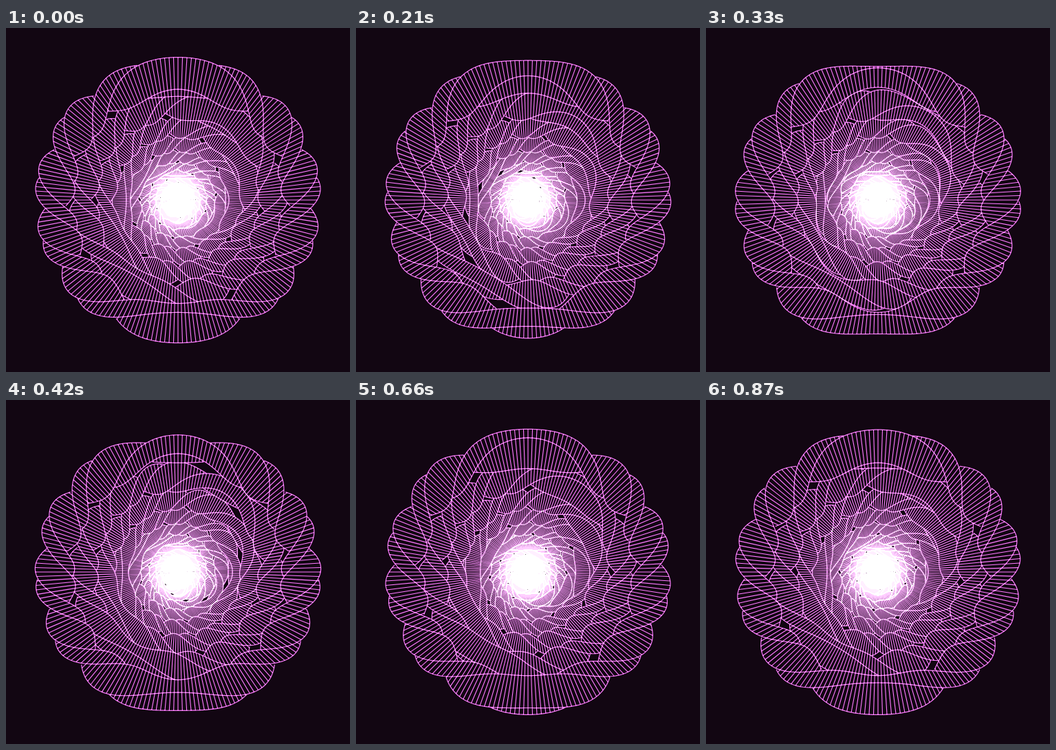
An HTML page with a canvas for the animation above (0.9 s loop, 500 by 500 pixels).

```html
<!DOCTYPE html>
<html lang="en">
<head>
<meta charset="utf-8">
<title>Twisting rings</title>
<style>
html, body { margin: 0; width: 100%; height: 100%; overflow: hidden; background: #120612; }
canvas { display: block; width: 500px; height: 500px; }
</style>
</head>
<body>
<canvas id="stage" width="500" height="500"></canvas>
<script>
const ctx = document.getElementById('stage').getContext('2d');
const LOOP = 900, STEP = 30;
const RINGS = 21, SPOKES = 200, FINE = 3;
const RADIUS = 179, SWING = 28.7, SHRINK = 0.772;
const TURN = Math.PI / 6;
const DEG = Math.PI / 180;
const BACK = '#120612';
// Corners of the twisted bar's cross-section.
const CORNERS = [82, 141, 262, 321].map(d => d * DEG);

// Twist of a ring at height s (1 at its pole, -1 opposite).
const twist = s => 7.8 * s - 0.85 * s * (1 - s * s) - 7.8;

const mix = (a, b, k) => Math.round(a + (b - a) * k);

function ringColor(i) {
  const k = Math.min(1, (i / 7.5) ** 2);
  return `rgb(${mix(238, 255, k)},${mix(116, 250, k)},${mix(240, 255, k)})`;
}

// Cross-sections of ring i, all the way round.
function sections(i, phase) {
  const scale = SHRINK ** i;
  const pole = Math.PI / 2 - i * TURN;
  const count = SPOKES * FINE;
  return Array.from({ length: count }, (_, j) => {
    const a = j / count * 2 * Math.PI;
    const cx = Math.cos(a) * scale, cy = -Math.sin(a) * scale;
    const at = d => [250 + (RADIUS + d) * cx, 250 + (RADIUS + d) * cy];
    const psi = twist(Math.cos(a - pole)) + phase;
    const offsets = CORNERS.map(c => SWING * Math.sin(psi + c));
    const reach = Math.max(...offsets);
    return {
      outer: at(reach),
      inner: at(-reach),
      corners: offsets.map((d, k) => ({
        p: at(d),
        seen: Math.cos(psi + CORNERS[k]) > 0 || Math.abs(d) > reach - 1e-6
      }))
    };
  });
}

function trace(points) {
  points.forEach((p, j) => j ? ctx.lineTo(...p) : ctx.moveTo(...p));
  ctx.closePath();
}

function drawRing(i, phase) {
  const ring = sections(i, phase);

  // The bar hides whatever lies under it.
  ctx.globalCompositeOperation = 'source-over';
  ctx.fillStyle = BACK;
  ctx.beginPath();
  trace(ring.map(s => s.outer));
  trace(ring.map(s => s.inner));
  ctx.fill('evenodd');

  ctx.globalCompositeOperation = 'lighter';
  ctx.strokeStyle = ringColor(i);
  ctx.lineWidth = 1.1;
  ctx.beginPath();
  for (let j = 0; j < ring.length; j += FINE) {
    ctx.moveTo(...ring[j].inner);
    ctx.lineTo(...ring[j].outer);
  }
  ctx.stroke();

  ctx.lineWidth = 1.2;
  ctx.beginPath();
  CORNERS.forEach((_, k) => {
    let open = false;
    for (let j = 0; j <= ring.length; j++) {
      const { p, seen } = ring[j % ring.length].corners[k];
      if (seen) open ? ctx.lineTo(...p) : ctx.moveTo(...p);
      open = seen;
    }
  });
  ctx.stroke();
}

function draw(time) {
  const t = Math.floor(time % LOOP / STEP) * STEP / LOOP;
  ctx.globalCompositeOperation = 'source-over';
  ctx.fillStyle = BACK;
  ctx.fillRect(0, 0, 500, 500);
  ctx.lineJoin = 'round';
  for (let i = RINGS - 1; i >= 0; i--) drawRing(i, t * Math.PI);
}

let last = -1;
const start = performance.now();
function tick() {
  const time = Math.max(0, performance.now() - start);
  const step = Math.floor(time / STEP);
  if (step !== last) {
    last = step;
    draw(time);
  }
  requestAnimationFrame(tick);
}
tick();
</script>
</body>
</html>
```
